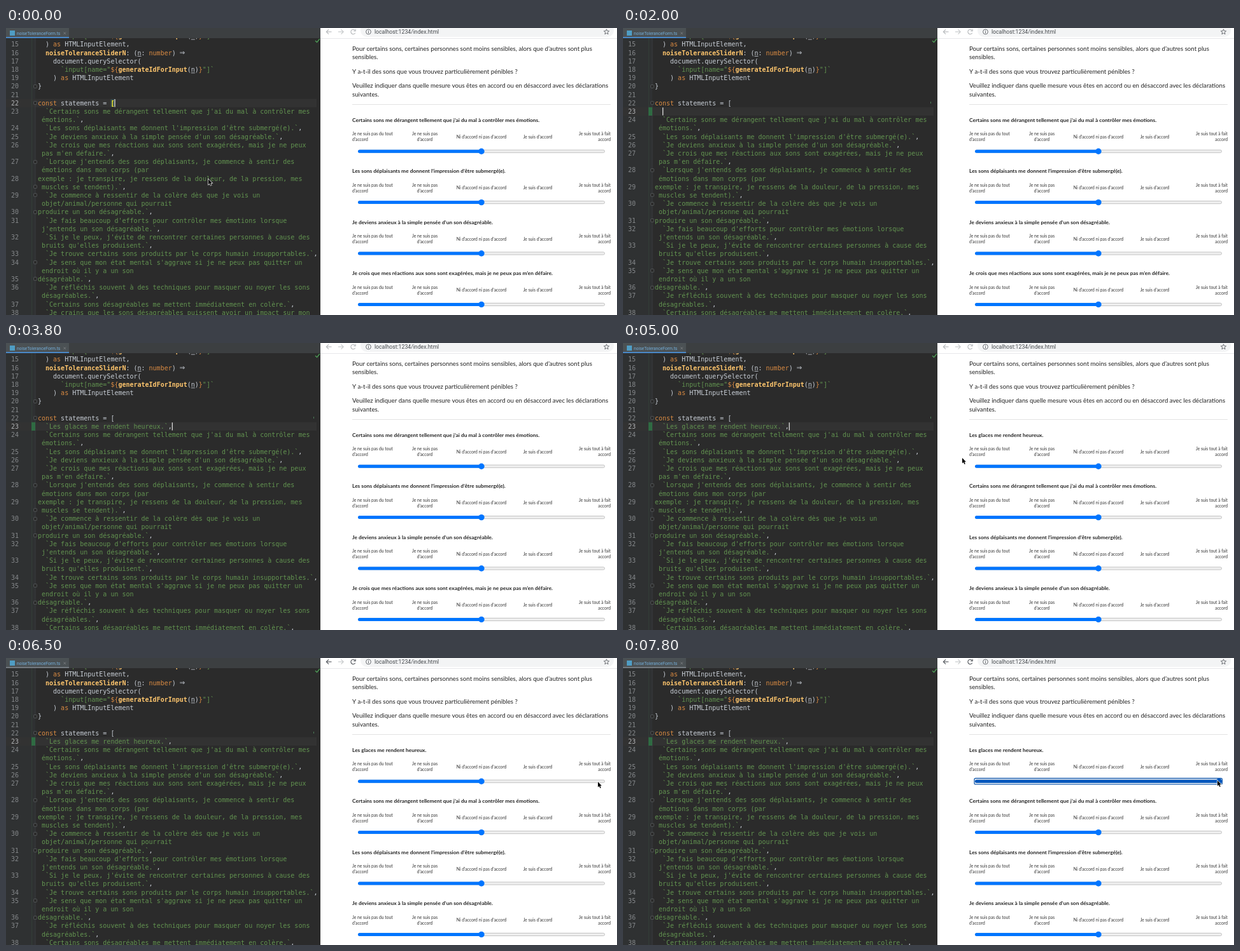
Animation of 960 by 452 pixels, one loop 7900 ms. Source, as an HTML page with a canvas:

```html
<!DOCTYPE html>
<html lang="fr">
<head>
<meta charset="utf-8">
<title>Formulaire</title>
<style>
html, body { margin: 0; width: 100%; height: 100%; overflow: hidden; background: #fff; }
canvas { display: block; }
</style>
</head>
<body>
<canvas id="stage" width="960" height="452"></canvas>
<script>
const ctx = document.getElementById('stage').getContext('2d');
const LOOP = 7900;
const ENTER = 1900, TYPE_START = 2800, TYPE_END = 3650, RELOAD = 4500, FOCUS = 6200, CLICK = 7100;

const MONO = '10px "DejaVu Sans Mono", monospace';
const MONO_BOLD = 'bold ' + MONO;
const UI = 'Roboto, sans-serif';
const LATO = 'Lato, sans-serif';
const CHAR = 6.02, ROW = 13.2, CODE_X = 50, FIRST_Y = 25.8;
const C = {
  bg: '#2b2b2b', gutter: '#2f3132', row: '#323232', bar: '#3c3f41', tab: '#4b5154',
  num: '#85888b', text: '#c8ced6', string: '#629350', key: '#d98a42', name: '#ffc66d', blue: '#0075ff'
};

const ADDED = '`Les glaces me rendent heureux.`,';
const QUESTIONS = [
  'Certains sons me dérangent tellement que j’ai du mal à contrôler mes émotions.',
  'Les sons déplaisants me donnent l’impression d’être submergé(e).',
  'Je deviens anxieux à la simple pensée d’un son désagréable.',
  'Je crois que mes réactions aux sons sont exagérées, mais je ne peux pas m’en défaire.'
];

// Coloured code: each part is [text, colour key, bold]
const TEMPLATE = [['      `input[name="', 'string'], ['${', 'key'], ['generateIdForInput', 'name', 1], ['(', 'text'],
  ['n', 'text', 0, 1], [')', 'text'], ['}', 'key'], ['"]`', 'string']];
const HEAD = [
  TEMPLATE,
  [['  ) ', 'text'], ['as ', 'key'], ['HTMLInputElement,', 'text']],
  [['  ', 'text'], ['noiseToleranceSliderN', 'name', 1], [': (', 'text'], ['n', 'text', 0, 1], [': ', 'text'],
    ['number', 'key'], [') ', 'text'], ['⇒', 'arrow']],
  [['    document.querySelector(', 'text']],
  TEMPLATE,
  [['    ) ', 'text'], ['as ', 'key'], ['HTMLInputElement', 'text']],
  [['}', 'text']],
  [],
  [['const ', 'key'], ['statements = ', 'text']]
];

// Each line starts a numbered row; "|" marks a soft wrap, "^" a fold mark
const BODY = [
  '  `Certains sons me dérangent tellement que j\'ai du mal à contrôler mes| émotions.`,',
  '  `Les sons déplaisants me donnent l\'impression d\'être submergé(e).`,',
  '  `Je deviens anxieux à la simple pensée d\'un son désagréable.`,',
  '  `Je crois que mes réactions aux sons sont exagérées, mais je ne peux| pas m\'en défaire.`,',
  '^  `Lorsque j\'entends des sons déplaisants, je commence à sentir des| émotions dans mon corps (par',
  'exemple : je transpire, je ressens de la douleur, de la pression, mes|^ muscles se tendent).`,',
  '^  `Je commence à ressentir de la colère dès que je vois un| objet/animal/personne qui pourrait',
  '^produire un son désagréable.`,',
  '  `Je fais beaucoup d\'efforts pour contrôler mes émotions lorsque| j\'entends un son désagréable.`,',
  '  `Si je le peux, j\'évite de rencontrer certaines personnes à cause des| bruits qu\'elles produisent.`,',
  '  `Je trouve certains sons produits par le corps humain insupportables.`,',
  '^  `Je sens que mon état mental s\'aggrave si je ne peux pas quitter un| endroit où il y a un son',
  '^désagréable.`,',
  '  `Je réfléchis souvent à des techniques pour masquer ou noyer les sons| désagréables.`,',
  '  `Certains sons désagréables me mettent immédiatement en colère.`,',
  '  `Je crains que les sons désagréables puissent avoir un impact sur mon'
];

function rect(x, y, w, h, color) {
  ctx.fillStyle = color;
  ctx.fillRect(x, y, w, h);
}

function text(str, x, y, font, color, align = 'left') {
  ctx.font = font;
  ctx.fillStyle = color;
  ctx.textAlign = align;
  ctx.fillText(str, x, y);
}

function line(points, color, width = 1) {
  ctx.strokeStyle = color;
  ctx.lineWidth = width;
  ctx.beginPath();
  points.forEach(([x, y]) => ctx.lineTo(x, y));
  ctx.stroke();
}

function pill(x, y, w, h, r, fill, stroke, width = 1) {
  ctx.beginPath();
  ctx.roundRect(x, y, w, h, r);
  if (fill) { ctx.fillStyle = fill; ctx.fill(); }
  if (stroke) { ctx.strokeStyle = stroke; ctx.lineWidth = width; ctx.stroke(); }
}

const rowY = i => FIRST_Y + ROW * i;

function lineNumber(n, y, current) {
  text(n, 20, y + 3.6, MONO, current ? '#b0b2b4' : C.num, 'right');
}

function foldMark(y) {
  pill(43.5, Math.round(y) - 2.5, 5, 5, 1, C.bg, '#5a5d5f', 0.8);
}

function codeLine(parts, y) {
  let x = CODE_X;
  for (const [str, kind, bold, under] of parts) {
    if (kind === 'arrow') {
      text(str, x, y + 4, '14px "DejaVu Sans Mono", monospace', C.text);
      continue;
    }
    text(str, x, y + 3.6, bold ? MONO_BOLD : MONO, C[kind]);
    const w = str.length * CHAR;
    if (under) rect(x, y + 5, w, 0.8, C.text);
    x += w;
  }
}

function stringLine(str, y) {
  const comma = str.endsWith('`,');
  const shown = comma ? str.slice(0, -1) : str;
  text(shown, CODE_X, y + 3.6, MONO, C.string);
  if (comma) text(',', CODE_X + shown.length * CHAR, y + 3.6, MONO, C.text);
}

function editor(t) {
  const inserted = t >= ENTER;
  const focused = t < FOCUS;
  rect(0, 0, 494, 452, C.bg);
  rect(0, 0, 46, 452, C.gutter);
  rect(0, rowY(inserted ? 8 : 7) - 6.6, 488, ROW, C.row);
  line([[46, 16], [46, 92]], '#414446', 0.7);
  line([[46, 118], [46, 452]], '#414446', 0.7);
  line([[40.5, 16], [40.5, 452]], '#34463a', 0.7);

  HEAD.forEach((parts, i) => {
    const y = rowY(i - 1);
    lineNumber(14 + i, y, !inserted && i === 8);
    codeLine(parts, y);
  });
  foldMark(rowY(5));
  foldMark(rowY(7));

  const bracketX = CODE_X + 19 * CHAR;
  if (!inserted) rect(bracketX, rowY(7) - 6, CHAR, 12, '#3b514d');
  text('[', bracketX, rowY(7) + 3.6, inserted ? MONO : MONO_BOLD, inserted ? C.text : '#ffef28');

  let row = 8, num = 23;
  let caretX = bracketX + CHAR;
  if (inserted) {
    const k = Math.max(0, Math.min(1, (t - TYPE_START) / (TYPE_END - TYPE_START)));
    const count = Math.round(k * ADDED.length);
    rect(40, rowY(8) - 6.6, 6, ROW, '#2f6b43');
    lineNumber(num++, rowY(8), true);
    stringLine('  ' + ADDED.slice(0, count), rowY(8));
    caretX = CODE_X + (2 + count) * CHAR;
    row++;
  }
  const caretRow = inserted ? 8 : 7;
  const typing = t >= TYPE_START && t < TYPE_END;
  const blinkOn = t < ENTER ? t % 1200 < 0.5 * 1200 && t < 1800 && !(t >= 1200 && t < 1700)
    : (t - ENTER) % 1000 < 600 || typing || (t >= 2600 && t < 2800) || (t >= 3650 && t < 4100);
  const wake = t >= 4900 && t < 5300;
  if (focused && (blinkOn || wake)) rect(caretX, rowY(caretRow) - 6.2, 1.2, 12.4, '#e8e8e8');

  for (const entry of BODY) {
    entry.split('|').forEach((part, i) => {
      const y = rowY(row++);
      if (i === 0) lineNumber(num, y, false);
      if (part[0] === '^') foldMark(y);
      stringLine(part.replace('^', ''), y);
    });
    num++;
  }

  rect(0, 0, 494, 16, C.bar);
  rect(0, 0, 99, 16, C.tab);
  rect(0, 14, 99, 2, focused ? '#4a88c7' : '#747a80');
  rect(6, 4, 8, 8, '#4f9dc4');
  text('noiseToleranceForm.ts', 17, 10.6, '6.7px ' + UI, '#74b0dc');
  line([[90.5, 6.5], [94, 10]], '#8a8d8f', 0.7);
  line([[94, 6.5], [90.5, 10]], '#8a8d8f', 0.7);
  line([[486, 20], [488.5, 22.5], [493, 17]], '#4c9a55', 1.4);
  if (inserted) rect(483, 116, 1, 3, '#4c7a58');
}

function toolbar(active) {
  const ink = active ? '#50545a' : '#b4b7ba';
  pill(557, -6, 398, 20, 10, '#f3f4f5');
  line([[511.5, 6], [503.5, 6]], ink, 1.1);
  line([[507, 2.3], [503.3, 6], [507, 9.7]], ink, 1.1);
  line([[522, 6], [530, 6]], '#c4c6c8', 1.1);
  line([[526.5, 2.3], [530.2, 6], [526.5, 9.7]], '#c4c6c8', 1.1);
  ctx.beginPath();
  ctx.arc(545.5, 6, 3.6, 0.5, 5.5);
  ctx.strokeStyle = ink;
  ctx.lineWidth = 1.1;
  ctx.stroke();
  line([[549.2, 1.8], [549.2, 4.6], [546.4, 4.6]], ink, 1.1);

  pill(565.6, 2.1, 7.8, 7.8, 4, null, '#5f6368', 0.9);
  rect(569, 5.4, 1, 2.9, '#5f6368');
  rect(569, 3.7, 1, 1, '#5f6368');
  text('localhost:1234/index.html', 579, 9.2, '8.7px ' + UI, '#45494d');

  const star = [];
  for (let i = 0; i <= 10; i++) {
    const a = -Math.PI / 2 + i * Math.PI / 5, r = i % 2 ? 1.9 : 4.4;
    star.push([943.5 + r * Math.cos(a), 6.2 + r * Math.sin(a)]);
  }
  line(star, '#5f6368', 0.9);
  rect(494, 16, 466, 0.8, '#e2e3e5');
}

function slider(y, atMax) {
  const x0 = 553, x1 = 941;
  const thumb = atMax ? 936.5 : 747;
  const color = atMax ? '#0056bd' : C.blue;
  if (atMax) pill(552, y - 4.7, 389.5, 9.4, 2, '#fff', '#1b5eae', 1.3);
  pill(x0 + 0.4, y - 2.1, x1 - x0 - 0.8, 4.2, 2.1, '#efefef', '#b8b8b8', 0.8);
  pill(x0, y - 2.5, thumb - x0, 5, 2.5, color);
  pill(thumb - 4.7, y - 4.7, 9.4, 9.4, 4.7, color);
}

function field(title, y, atMax) {
  const small = (s, x, dy, align) => text(s, x, y + dy + 2.3, '6.78px ' + LATO, '#333', align);
  text(title, 544, y + 3, 'bold 8.4px ' + LATO, '#222');
  small('Je ne suis pas du tout', 544, 22);
  small('d’accord', 544, 31);
  small('Je ne suis pas', 658, 22, 'center');
  small('d’accord', 658, 31, 'center');
  small('Ni d’accord ni pas d’accord', 747, 26.5, 'center');
  small('Je suis d’accord', 835.5, 26.5, 'center');
  small('Je suis tout à fait', 950, 22, 'right');
  small('accord', 950, 31, 'right');
  slider(y + 49.2, atMax);
}

function browser(t) {
  rect(494, 0, 466, 452, '#fff');
  toolbar(t >= FOCUS);
  const para = (s, y) => text(s, 544, y + 3.3, '9.7px ' + LATO, '#222');
  para('Pour certains sons, certaines personnes sont moins sensibles, alors que d’autres sont plus', 32.3);
  para('sensibles.', 45.6);
  para('Y a-t-il des sons que vous trouvez particulièrement pénibles ?', 68.5);
  para('Veuillez indiquer dans quelle mesure vous êtes en accord ou en désaccord avec les déclarations', 91);
  para('suivantes.', 104.5);
  rect(544, 120, 406, 0.8, '#dcdcdc');

  const list = t < RELOAD ? QUESTIONS : [ADDED.slice(1, -2), ...QUESTIONS.slice(0, 3)];
  list.forEach((q, i) => field(q, 145 + 80.4 * i, i === 0 && t >= CLICK));
}

// Pointer path: [time, x, y]
const PATHS = [
  [[0, 318, 238], [200, 318, 238], [1000, 206, 118], [ENTER, 206, 118]],
  [[4300, 420, 168], [5000, 533, 181], [6200, 930, 195], [6700, 930, 195], [7000, 934, 193], [LOOP, 934, 193]]
];

function pointer(t) {
  const path = PATHS.find(p => t >= p[0][0] && t < p[p.length - 1][0]);
  if (!path) return;
  const i = path.findIndex(p => p[0] > t);
  const [t0, x0, y0] = path[i - 1], [t1, x1, y1] = path[i];
  const k = (t - t0) / (t1 - t0), e = k * k * (3 - 2 * k);
  ctx.save();
  ctx.translate(x0 + (x1 - x0) * e, y0 + (y1 - y0) * e);
  ctx.beginPath();
  [[0, 0], [0, 8.6], [2, 6.8], [3.4, 10], [4.8, 9.4], [3.5, 6.3], [6, 6.2]].forEach(p => ctx.lineTo(...p));
  ctx.closePath();
  ctx.lineWidth = 1.3;
  ctx.strokeStyle = '#fff';
  ctx.stroke();
  ctx.fillStyle = '#000';
  ctx.fill();
  ctx.restore();
}

function draw(t) {
  editor(t);
  browser(t);
  pointer(t);
}

const start = performance.now();
function tick() {
  draw((performance.now() - start) % LOOP);
  requestAnimationFrame(tick);
}
draw(0);
requestAnimationFrame(tick);
</script>
</body>
</html>
```
